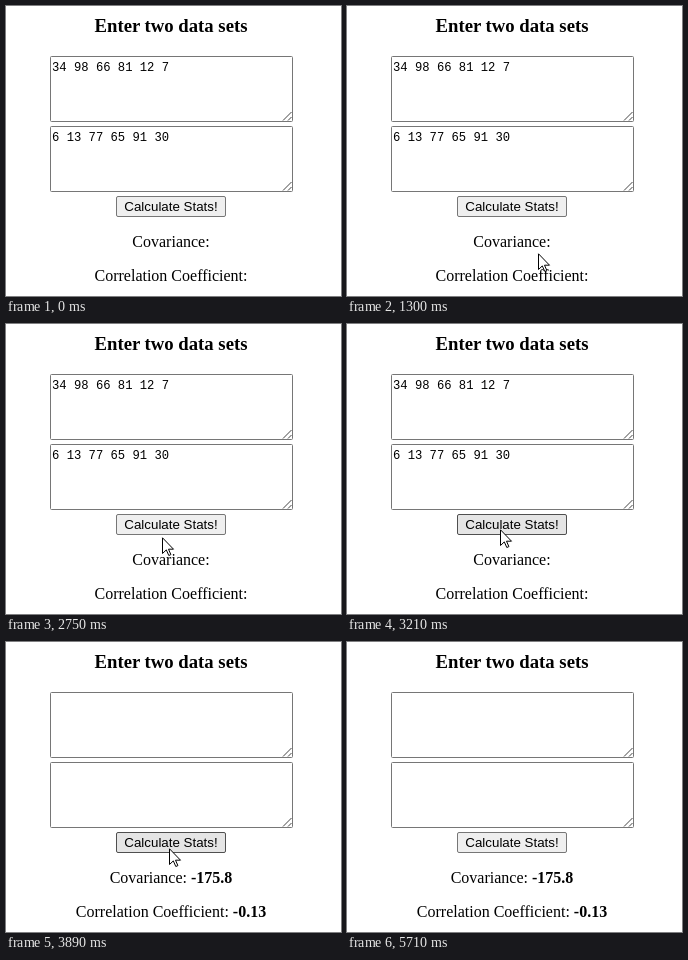
Recreate the animation shown at these times as an HTML page. Size 335 px wide and 290 px high, loop 5810 ms.

```html
<!DOCTYPE html>
<html lang="en">
<head>
<meta charset="utf-8">
<title>Enter two data sets</title>
<style>
  html, body { margin: 0; width: 100%; height: 100%; overflow: hidden; background: #fff; }
  svg { display: block; width: 335px; height: 290px; }
  .page { font: 16px "Liberation Serif", "Times New Roman", serif; text-anchor: middle; }
  .page .title { font-size: 18.72px; font-weight: bold; }
  .page .label { font: 13.333px "Liberation Sans", Arial, sans-serif; }
  .bold { font-weight: bold; }
  .field { font: 12.2px "Liberation Mono", "DejaVu Sans Mono", monospace; }
  .box { fill: #fff; stroke: #767676; }
  .grip { fill: none; stroke: #444; }
  #button { fill: #efefef; stroke: #767676; }
  #button.hover { fill: #e5e5e5; stroke: #4f4f4f; }
  #button.active { fill: #f5f5f5; stroke: #8d8d8d; }
  #glow { fill: rgba(255, 240, 0, .65); }
  #beam { fill: none; stroke: #fff; mix-blend-mode: difference; }
  #arrow { fill: #fff; stroke: #000; }
</style>
</head>
<body>
<svg viewBox="0 0 335 290">
  <defs>
    <g id="area">
      <rect class="box" x=".5" y=".5" width="242" height="65" rx="1"/>
      <path class="grip" d="M233 64.5L241.5 56M238 64.5L241.5 61"/>
    </g>
  </defs>
  <rect width="335" height="290" fill="#fff"/>
  <use href="#area" x="44" y="50"/>
  <use href="#area" x="44" y="120"/>
  <g id="data" class="field">
    <text x="46" y="65">34 98 66 81 12 7</text>
    <text x="46" y="135">6 13 77 65 91 30</text>
  </g>
  <rect id="button" x="110.5" y="190.5" width="109" height="20" rx="1.5"/>
  <g class="page">
    <text class="title" x="165" y="26">Enter two data sets</text>
    <text class="label" x="165" y="205">Calculate Stats!</text>
    <text id="cov" x="165" y="241">Covariance:<tspan class="bold"></tspan></text>
    <text id="cor" x="165" y="275">Correlation Coefficient:<tspan class="bold"></tspan></text>
  </g>
  <circle id="glow" cx="153" cy="205" r="12"/>
  <path id="beam" d="M-3-7.5h3m1 0h3M.5-7V7M-3 7.5h3m1 0h3"/>
  <path id="arrow" d="M.5.8V16.5L4.3 12.9L6.8 18.5L8.9 17.6L6.5 12.2H11.5Z"/>
</svg>
<script>
const LOOP = 5810, PRESS = 3350, RELEASE = 3530, GLOW_END = 3580;

// Pointer stops: time, x, y
const stops = [
  [240, 249, 286], [820, 216, 261], [1420, 185, 244], [2100, 167, 229],
  [2730, 156, 213], [3210, 153, 205], [3740, 153, 205], [3890, 163, 206],
  [4350, 237, 252], [4810, 286, 290]
];

const $ = id => document.getElementById(id);
const show = (id, on) => $(id).setAttribute('visibility', on ? 'visible' : 'hidden');
const setValue = (id, text) => { $(id).lastChild.textContent = text; };

function pointer(t) {
  const i = stops.findIndex(s => s[0] > t);
  if (i < 1) return null;
  const a = stops[i - 1], b = stops[i];
  const f = (t - a[0]) / (b[0] - a[0]);
  const [x, y] = [1, 2].map(k => Math.round(a[k] + (b[k] - a[k]) * f));
  return { x, y };
}

function over(p, id) {
  if (!p) return false;
  const b = $(id).getBBox();
  return p.x >= b.x && p.x < b.x + b.width && p.y >= b.y && p.y <= b.y + b.height;
}

function draw(t) {
  const done = t >= RELEASE;
  setValue('cov', done ? ' -175.8' : '');
  setValue('cor', done ? ' -0.13' : '');
  show('data', !done);
  show('glow', t >= PRESS && t < GLOW_END);

  const p = pointer(t);
  const pressed = t >= PRESS && !done;
  const look = pressed ? 'active' : over(p, 'button') ? 'hover' : '';
  $('button').setAttribute('class', look);

  const overText = over(p, 'cov') || over(p, 'cor');
  show('beam', p && overText);
  show('arrow', p && !overText);
  if (p) for (const id of ['beam', 'arrow'])
    $(id).setAttribute('transform', `translate(${p.x} ${p.y})`);
}

const start = performance.now();
function tick() {
  draw((performance.now() - start) % LOOP);
  requestAnimationFrame(tick);
}
tick();
</script>
</body>
</html>
```
